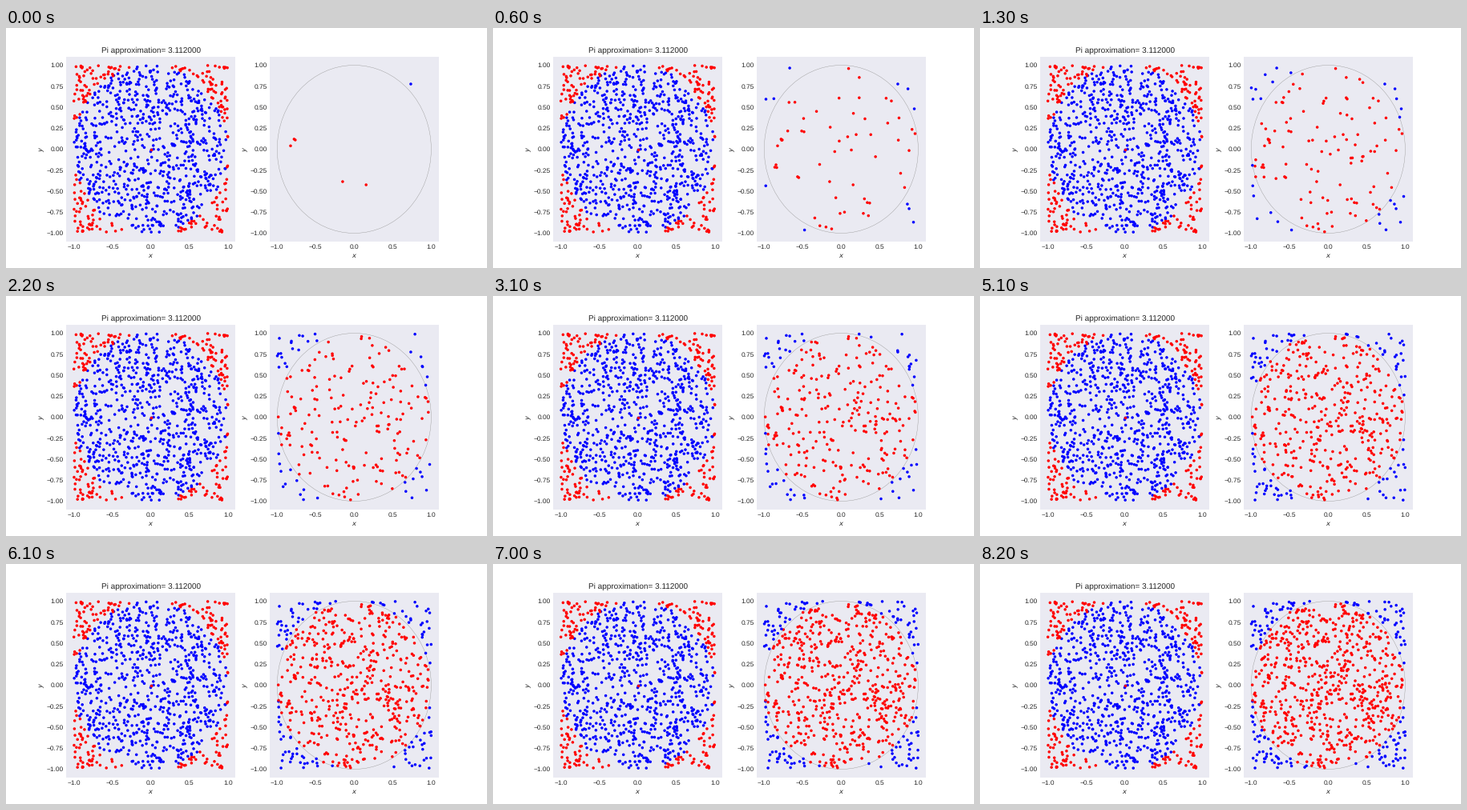
Animation, 600 px wide and 300 px high, one loop 8.3 s. Source, as a matplotlib script:

```python
import numpy as np
import matplotlib.pyplot as plt
from matplotlib.animation import FuncAnimation

FRAMES, INTERVAL = 83, 100
PER_FRAME = 10

plt.rcParams.update({
    "font.family": "Liberation Sans",
    "text.hinting": "none",
    "text.color": "0.15",
    "axes.labelcolor": "0.15",
    "xtick.color": "0.15",
    "ytick.color": "0.15",
    "axes.facecolor": "#EAEAF2",
    "axes.linewidth": 0,
    "xtick.major.size": 0,
    "ytick.major.size": 0,
})

rng = np.random.default_rng(12)


def inside(pts):
    return np.hypot(pts[:, 0], pts[:, 1]) <= 1


def throw(n):
    return rng.uniform(-1, 1, (n, 2))


def throw_with_hits(n, hits):
    """n uniform throws, exactly the given number of them in the circle."""
    pts = throw(4 * n)
    hit = inside(pts)
    return np.vstack([pts[hit][:hits], pts[~hit][:n - hits]])


def dots(ax, pts, colors):
    return ax.scatter(pts[:, 0], pts[:, 1], s=18, c=colors, linewidths=0)


fig, (left, right) = plt.subplots(1, 2, figsize=(10, 5), dpi=60)
for ax in (left, right):
    ax.set(xlim=(-1.1, 1.1), ylim=(-1.1, 1.1),
           xticks=np.linspace(-1, 1, 5), yticks=np.linspace(-1, 1, 9))
    ax.set_xlabel("$x$")
    ax.set_ylabel("$y$", labelpad=1)

# Finished estimate: 4 * 778 / 1000
left.set_title("Pi approximation= 3.112000")
done = throw_with_hits(1000, 778)
dots(left, done, np.where(inside(done), "blue", "red"))
dots(left, np.zeros((1, 2)), "red")

# Running experiment
start = np.array([(0.735, 0.776), (-0.78, 0.12), (-0.765, 0.11),
                  (-0.826, 0.04), (-0.15, -0.386), (0.155, -0.424)])
throws = np.vstack([start, throw(PER_FRAME * (FRAMES - 1))])
colors = np.where(inside(throws), "red", "blue")
right.add_patch(plt.Circle((0, 0), 1, fill=False, ec="0.6", lw=0.5))
cloud = dots(right, start, colors[:len(start)])


def update(frame):
    n = len(start) + PER_FRAME * frame
    cloud.set_offsets(throws[:n])
    cloud.set_facecolor(colors[:n])
    return cloud,


anim = FuncAnimation(fig, update, frames=FRAMES, interval=INTERVAL,
                     repeat=True, repeat_delay=0)
plt.show()
```
